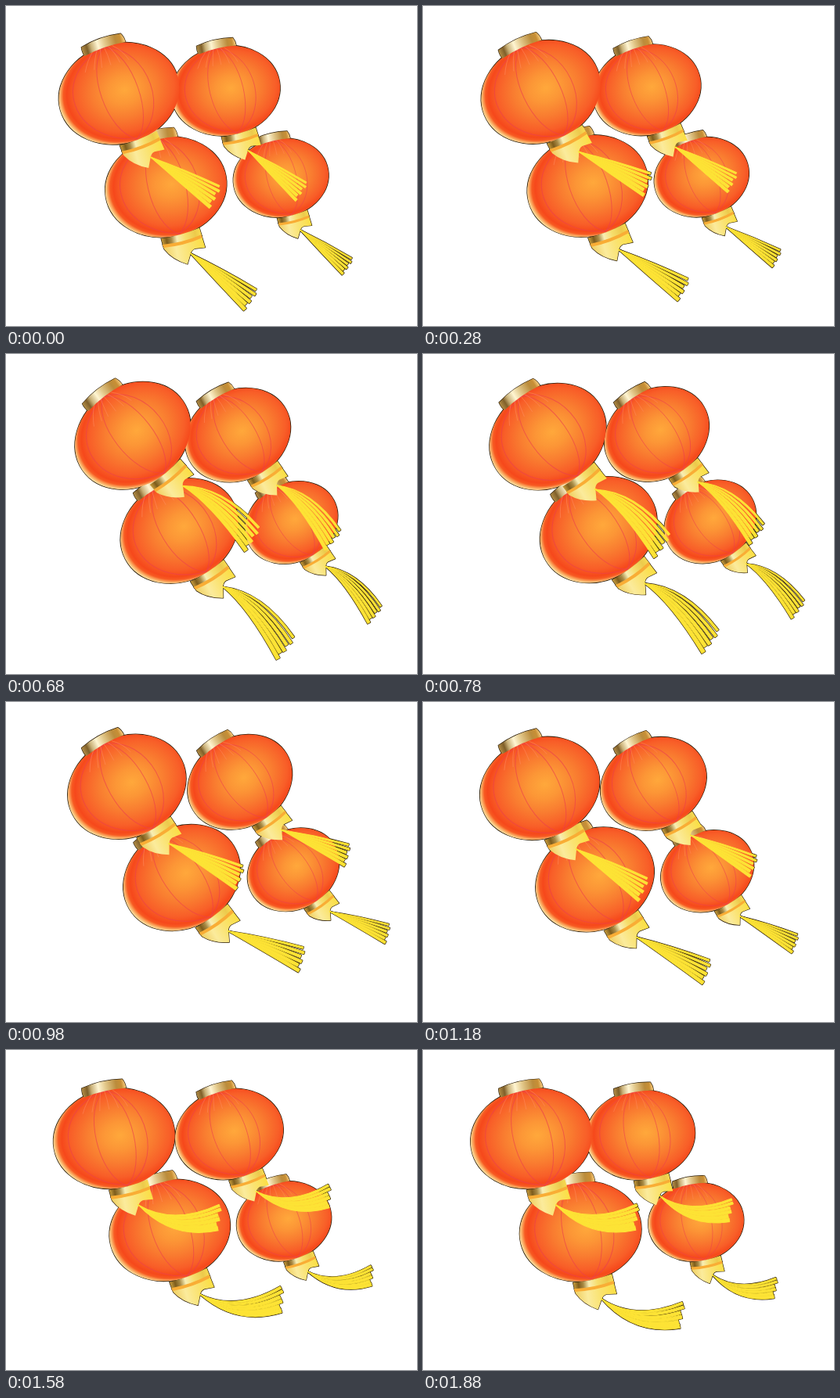
An HTML page with a canvas that plays this animation: 525 by 409 pixels, repeating every 1980 ms.

```html
<!DOCTYPE html>
<html lang="en">
<head>
<meta charset="utf-8">
<title>Swinging lanterns</title>
<style>
  html, body { margin: 0; width: 100%; height: 100%; overflow: hidden; background: #fff; }
  canvas { display: block; }
</style>
</head>
<body>
<canvas id="stage" width="525" height="409"></canvas>
<script>
const ctx = document.getElementById('stage').getContext('2d');
const LOOP = 1980, FIRST = 180, STEP = 100;
const INK = '#2a1c08', YELLOW = '#fde335';

// Swing angle in degrees as [step, angle] pairs, linear in between.
const lead = [[0, 16], [6, 34.5], [16, 7], [17, 6.3], [18, 10]];
const follow = [[0, 10], [8, 33.4], [18, 7]];

// Painted back to front; x, y is the pivot under the cap.
const lanterns = [
  { x: 344.7, y: 173.7, size: 0.785, swing: follow },
  { x: 196, y: 172.8, size: 1, swing: follow },
  { x: 273.3, y: 56, size: 0.895, swing: follow },
  { x: 130.1, y: 54.5, size: 1, swing: lead }
];

// Control point and end point of the two outermost strands.
const tassels = {
  forward: { from: [54, 118, 91, 150], to: [44, 129, 71, 170], width: 1.5 },
  down: { from: [57, 118, 66, 189], to: [35, 128, 36, 201], width: 1.7 },
  back: { from: [52, 120, 88, 157], to: [42, 131, 67, 177], width: 1.5 },
  up: { from: [56, 124, 119, 107], to: [50, 138, 109, 136], width: 1.9 }
};
const STRANDS = 6, ROOT = [16, 89];

const mix = (a, b, k) => a + (b - a) * k;

function angleAt(keys, step) {
  const next = keys.findIndex(key => key[0] >= step);
  if (next <= 0) return keys[0][1];
  const [s0, a0] = keys[next - 1], [s1, a1] = keys[next];
  return mix(a0, a1, (step - s0) / (s1 - s0));
}

function tasselAt(step) {
  if (step < 3) return tassels.forward;
  if (step < 8) return tassels.down;
  return step < 13 ? tassels.back : tassels.up;
}

function addStops(gradient, stops) {
  stops.forEach(([at, color]) => gradient.addColorStop(at, color));
  return gradient;
}
const across = (x0, x1, stops) => addStops(ctx.createLinearGradient(x0, 0, x1, 0), stops);

const capFill = across(-30, 25, [[0, '#b08b45'], [0.12, '#80602a'], [0.22, '#c9b077'],
  [0.38, '#fff5d2'], [0.55, '#e3c98c'], [0.8, '#bb8c3c'], [0.92, '#c88f35'], [1, '#f0c374']]);
const bandFill = across(-17, 34, [[0, '#c49a3c'], [0.12, '#7d5c1c'], [0.24, '#a88a45'],
  [0.38, '#f8eeb4'], [0.6, '#f6de6c'], [0.85, '#ecca4c'], [1, '#f7da50']]);
const cupFill = across(-16, 35, [[0, '#f0cf62'], [0.3, '#fbeb9c'], [0.6, '#fae373'], [1, '#fbdf45']]);
const bodyFill = addStops(ctx.createRadialGradient(8, -3, 0, 8, -3, 86), [[0, '#ffa83b'],
  [0.25, '#fc9636'], [0.5, '#f97c30'], [0.75, '#f85e28'], [0.87, '#f6481b'],
  [0.92, '#f75a22'], [0.96, '#fba45a'], [1, '#ffdf9f']]);

const body = new Path2D();
body.ellipse(0, 0, 78, 64, 0, 0, Math.PI * 2);
const cap = new Path2D('M-30 -70Q-4 -77 23 -73Q26 -68 26 -61Q-2 -64 -29 -58Q-31 -63 -30 -70Z');
const band = new Path2D('M-17.5 64Q8 65 33 59L34.5 71Q10 77 -16.5 74Z');
const stripe = new Path2D('M-17 72Q9 74 34 68L34.5 72Q10 78 -16.5 76Z');
const cup = new Path2D('M-17 72Q9 75 34 69L36 85L23 84Q18 85 16 90L10 102Q-8 93 -16 78Z');

const ribs = [-80, -33, 31, 53].map(x =>
  new Path2D(`M-2 -62C${x} -46 ${x + 4} 44 6 62`));
const rays = [-34, -22, -12, 0, 12, 24].map(x =>
  new Path2D(`M${x * 0.45 - 2} -61Q${x * 0.8} -52 ${x} -38`));

function strandPaths(tassel) {
  return Array.from({ length: STRANDS }, (_, i) => {
    const k = i / (STRANDS - 1);
    let [cx, cy, ex, ey] = tassel.from.map((v, j) => mix(v, tassel.to[j], k));
    const dx = ex - cx, dy = ey - cy, length = Math.hypot(dx, dy);
    const reach = i % 2 ? 2 : -1;
    ex += dx / length * reach;
    ey += dy / length * reach;
    const w = tassel.width * mix(0.8, 1.4, k), nx = -dy / length * w, ny = dx / length * w;
    return new Path2D(`M${ROOT}Q${cx + nx} ${cy + ny} ${ex + nx} ${ey + ny}` +
      `L${ex - nx} ${ey - ny}Q${cx - nx} ${cy - ny} ${ROOT}Z`);
  });
}
Object.values(tassels).forEach(t => { t.strands = strandPaths(t); });

function strokePath(path, color, width) {
  ctx.strokeStyle = color;
  ctx.lineWidth = width;
  ctx.stroke(path);
}
function fillPath(path, color) {
  ctx.fillStyle = color;
  ctx.fill(path);
}

function drawOutline(tassel, size) {
  [cap, body, band, cup].forEach(path => strokePath(path, INK, 1.3 / size));
  tassel.strands.forEach(path => strokePath(path, INK, 1 + 1.3 / size));
}

function drawLantern(tassel) {
  ctx.save();
  ctx.scale(1, 64 / 78);
  ctx.beginPath();
  ctx.arc(0, 0, 78, 0, Math.PI * 2);
  ctx.fillStyle = bodyFill;
  ctx.fill();
  ctx.restore();
  ribs.forEach(path => strokePath(path, 'rgba(236,64,78,.65)', 1));
  rays.forEach(path => strokePath(path, 'rgba(255,150,110,.5)', 0.8));
  fillPath(cap, capFill);
  fillPath(cup, cupFill);
  fillPath(band, bandFill);
  fillPath(stripe, '#f9ad35');
  tassel.strands.forEach(path => {
    fillPath(path, YELLOW);
    strokePath(path, YELLOW, 1);
  });
}

function place(lantern, step, paint) {
  ctx.save();
  ctx.translate(lantern.x, lantern.y);
  ctx.rotate(-angleAt(lantern.swing, step) * Math.PI / 180);
  ctx.scale(lantern.size, lantern.size);
  ctx.translate(-2, 59);
  paint();
  ctx.restore();
}

function render(now) {
  const time = now % LOOP;
  const step = time < FIRST ? 0 : 1 + Math.floor((time - FIRST) / STEP);
  const tassel = tasselAt(step);
  ctx.fillStyle = '#fff';
  ctx.fillRect(0, 0, 525, 409);
  ctx.lineJoin = ctx.lineCap = 'round';
  // All outlines go below all fills, so only the joint silhouette is edged.
  lanterns.forEach(l => place(l, step, () => drawOutline(tassel, l.size)));
  lanterns.forEach(l => place(l, step, () => drawLantern(tassel)));
}

const start = performance.now();
function tick() {
  render(performance.now() - start);
  requestAnimationFrame(tick);
}
tick();
</script>
</body>
</html>
```
